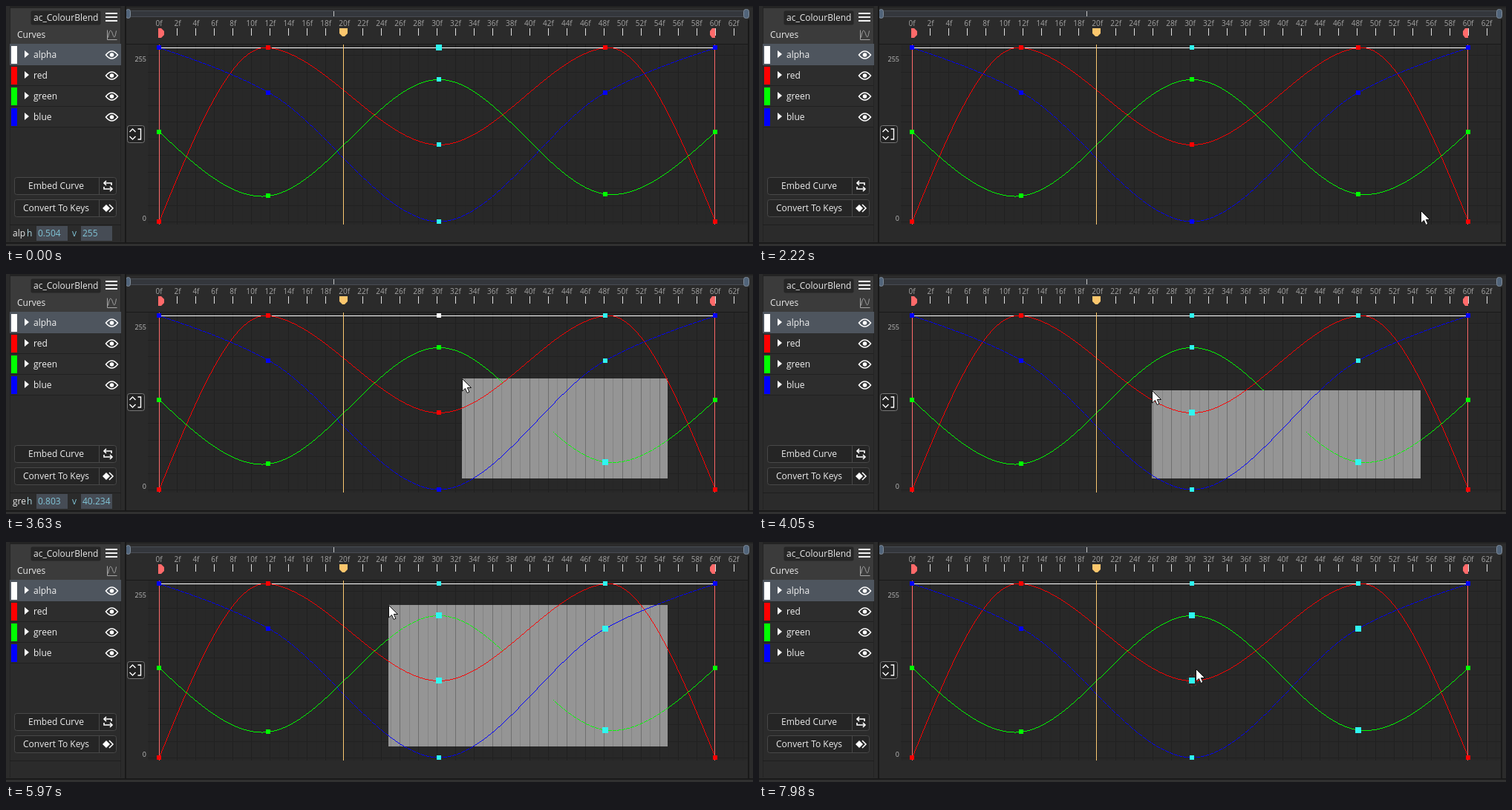
These frames come from a looping animation (1006x324 px, 8000 ms). An HTML page with a canvas:

```html
<!DOCTYPE html>
<html lang="en">
<head>
<meta charset="utf-8">
<title>Curve editor</title>
<style>
html, body { margin: 0; width: 100%; height: 100%; overflow: hidden; background: #2b2b2b; }
canvas { display: block; }
</style>
</head>
<body>
<canvas id="stage" width="1006" height="324"></canvas>
<script>
const ctx = document.getElementById('stage').getContext('2d');
const LOOP = 8000;
const CYAN = '#2ff5f0';
const ANCHOR = { x: 891, y: 276 };
const FRAME = 24.97 / 2;
const X = [206, 353, 583, 807, 955];

// y and slope at each key; the end slopes are relaxed
const curves = {
  alpha: { color: '#fff', y: [56, null, 56, null, 56] },
  blue: { color: '#00f', y: [56, 116.5, 290.5, 116.5, 56], slope: [0, .55, 0, -.55, 0] },
  green: { color: '#0f0', y: [170, 256, 99, 253.5, 170], slope: [0, -.12, 0, .12, 0] },
  red: { color: '#f00', y: [291, 56, 187, 56, 291], slope: [0, .12, 0, -.12, 0] }
};

for (const { y, slope } of Object.values(curves)) {
  if (!slope) continue;
  const relax = (a, b) => (3 * (y[b] - y[a]) / (X[b] - X[a]) - slope[b]) / 2;
  slope[0] = relax(0, 1);
  slope[4] = relax(4, 3);
}

// Pointer path: time, x, y, number of equal jumps since the previous entry
const path = [
  [1150, 948, 306, 1], [1660, 891, 276, 6], [2220, 891, 276, 1],
  [2580, 868, 250, 4], [2940, 800, 184, 4], [3030, 778, 166, 1],
  [3210, 744, 137, 2], [3480, 640, 140, 3], [3810, 535, 145, 4],
  [3900, 532, 152, 1], [4050, 529, 157, 1], [4200, 525, 160, 2],
  [4450, 524, 159, 1], [4630, 523, 158, 2], [4810, 522, 150, 1],
  [5080, 519, 113, 3], [5410, 517, 89, 4], [5690, 517, 88, 1],
  [5970, 515, 85, 1], [6230, 513, 77, 3], [6390, 512, 81, 2],
  [6570, 511, 84, 1], [6660, 511, 86, 1], [7380, 503, 52, 1],
  [7560, 510, 66, 1], [7980, 588, 171, 5]
];
const PRESS = 2220, RELEASE = 7380;

function pointerAt(t) {
  if (t < path[0][0]) return null;
  const i = path.findIndex(p => p[0] > t);
  if (i < 0) return { x: 588, y: 171 };
  const [t0, x0, y0] = path[i - 1], [t1, x1, y1, n] = path[i];
  const u = Math.floor((t - t0) / (t1 - t0) * n) / n;
  return { x: Math.round(x0 + (x1 - x0) * u), y: Math.round(y0 + (y1 - y0) * u) };
}

// Size of a selected key, 0 when it is not selected
function selection(t, name, key) {
  if (key === 2) {
    if (t < PRESS) return name === 'alpha' ? 8 : 6;
    if (t < 2940) return name === 'alpha' ? 6 : 0;
    if (t < 3727) return 0;
    return name === 'red' || name === 'green' && t >= 5327 ? 8 : 6;
  }
  if (key === 3 && t >= 2940)
    return name === 'green' || name === 'blue' && t >= 5080 ? 8 : 6;
  return 0;
}

function box(x, y, w, h, color) {
  ctx.fillStyle = color;
  ctx.fillRect(x, y, w, h);
}

function round(x, y, w, h, r, fill, stroke) {
  ctx.beginPath();
  ctx.roundRect(x + .5, y + .5, w - 1, h - 1, r);
  ctx.fillStyle = fill;
  ctx.fill();
  if (stroke) line(stroke);
}

function line(color, width = 1) {
  ctx.strokeStyle = color;
  ctx.lineWidth = width;
  ctx.stroke();
}

function shape(d, x, y, fill, stroke, width = 1) {
  const p = new Path2D(d);
  ctx.save();
  ctx.translate(x, y);
  if (fill) { ctx.fillStyle = fill; ctx.fill(p); }
  if (stroke) { ctx.strokeStyle = stroke; ctx.lineWidth = width; ctx.stroke(p); }
  ctx.restore();
}

function text(s, x, y, color = '#e8e8e8', size = 12, align = 'left') {
  ctx.font = `${size}px "Open Sans", "Noto Sans", sans-serif`;
  ctx.textAlign = align;
  ctx.fillStyle = color;
  ctx.fillText(s, x, y);
}

// Cubic Hermite value of a curve at x
function valueAt({ y, slope }, x) {
  x = Math.min(Math.max(x, X[0]), X[4]);
  const i = Math.max(1, X.findIndex(k => k >= x));
  const h = X[i] - X[i - 1], u = (x - X[i - 1]) / h, v = 1 - u;
  return v * v * (1 + 2 * u) * y[i - 1] + u * u * (1 + 2 * v) * y[i]
    + h * u * v * (v * slope[i - 1] - u * slope[i]);
}

// Crisp one-pixel line; every gap-th column is left out
function trace(curve, color = curve.color, x0 = X[0], x1 = X[4], gap = 0) {
  for (let x = x0; x <= x1; x++) {
    if (gap && x % gap === 0) continue;
    const a = Math.round(valueAt(curve, x - .5)), b = Math.round(valueAt(curve, x + .5));
    box(x, Math.min(a, b), 1, Math.max(1, Math.abs(a - b)), color);
  }
}

function drawSidebar(t) {
  box(0, 0, 162, 324, '#2b2b2b');
  box(5, 0, 150, 318, '#242424');
  box(6, 3, 148, 48, '#3b3b3b');
  round(33, 6, 95, 20, 2, '#262626');
  text('ac_ColourBlend', 37, 20);
  for (const y of [9, 14, 19]) box(134, y, 16, 2, '#f4f4f4');
  text('Curves', 15, 43);
  shape('M0 0V13H13M1 10C3 -2 5 -1 7 5S10 12 12 1', 136.5, 32.5, null, '#a5a5a5');

  box(5, 51, 150, 29, '#4e555e');
  ['alpha', 'red', 'green', 'blue'].forEach((name, i) => {
    const y = 52 + i * 28;
    if (i) {
      box(6, y, 148, 27, '#2d2d2d');
      box(6, y + 27, 148, 1, '#202020');
    }
    box(7, y + 2, 8, 24, curves[name].color);
    shape('M0 0L6 5L0 10Z', 25, y + 8, '#fff');
    text(name, 37, y + 18, '#f2f2f2');
    shape('M-8 0Q0 -10 8 0Q0 10 -8 0Z', 142.5, y + 14, null, '#fff', 1.5);
    ctx.beginPath();
    ctx.arc(142.5, y + 14, 2.8, 0, 7);
    ctx.fillStyle = '#fff';
    ctx.fill();
  });
  box(6, 164, 148, 131, '#2b2b2b');

  ['Embed Curve', 'Convert To Keys'].forEach((label, i) => {
    const y = 231 + 30 * i;
    round(11, y, 138, 24, 3, '#252525', '#484848');
    box(125, y + 1, 1, 22, '#484848');
    text(label, 67.5, y + 16, '#ececec', 12, 'center');
  });
  shape('M5 -1V-4H-5M-2 -7L-5 -4L-2 -1M-5 1V4H6M3 1L6 4L3 7', 137, 243, null, '#fff', 1.6);
  shape('M-7 0L-2 -5L3 0L-2 5Z', 137, 273, '#fff');
  shape('M2 -5L7 0L2 5', 137, 273, null, '#fff', 1.5);

  box(5, 295, 150, 1, '#1e1e1e');
  box(6, 296, 148, 22, '#2b2b2b');
  const info = t < PRESS ? ['alp', '0.504', '255']
    : t >= 2940 && t < 3727 ? ['gre', '0.803', '40.234'] : null;
  if (info) {
    text(info[0], 9, 311);
    text('h', 28, 311, '#a9d3dc');
    box(41, 297, 42, 20, '#464c55');
    text(info[1], 43, 311, '#80c4d6');
    text('v', 89, 311, '#80c4d6');
    box(101, 297, 42, 20, '#464c55');
    text(info[2], 103, 311, '#80c4d6');
  }
  box(160, 0, 2, 320, '#191919');
}

function drawMarkers() {
  shape('M0 0H4L8 4V9L4 13H0Z', 205, 30, '#ff6a6a');
  shape('M7 0H3L0 4V9L3 13H7Z', 948, 30, '#ff6a6a');
  shape('M0 0H11V7L7 11H4L0 7Z', 449, 30, '#fcc76d');
}

function drawRuler() {
  box(162, 0, 838, 51, '#2b2b2b');
  box(162, 0, 844, 2, '#222');
  round(165, 6, 834, 9, 3, '#34373c', '#484c53');
  box(441, 7, 1, 7, '#c6c6c6');
  round(161, 4, 7, 13, 3, '#51647a', '#7f8b98');
  round(993, 4, 8, 13, 3, '#51647a', '#7f8b98');
  for (let f = 0; f <= 62; f += 2) {
    const x = 206 + f * FRAME;
    text(f + 'f', x, 27, '#a2a2a2', 10, 'center');
    box(Math.floor(x), 30, 1, 10, '#e0e0e0');
  }
  box(162, 51, 838, 1, '#191919');
}

function drawGrid(x0, x1, y0, y1, odd, even) {
  for (let f = -1; f < 64; f++) {
    const x = Math.floor(206 + f * FRAME);
    if (x >= x0 && x < x1) box(x, y0, 1, y1 - y0, f % 2 ? odd : even);
  }
}

function drawSelection(p) {
  const w = ANCHOR.x - p.x, h = ANCHOR.y - p.y;
  if (w <= 0 || h <= 0) return;
  ctx.save();
  ctx.beginPath();
  ctx.rect(p.x, p.y, w, h);
  ctx.clip();
  box(p.x, p.y, w, h, '#959595');
  drawGrid(p.x, ANCHOR.x, p.y, ANCHOR.y, '#858585', '#6f6f6f');
  trace(curves.red);
  trace(curves.blue);
  trace(curves.green, '#0f0', 490, 668, 6);
  trace(curves.green, '#0f0', 737, 955, 6);
  ctx.restore();
}

function drawChart(t, p) {
  box(162, 52, 838, 267, '#2a2a2a');
  box(191, 52, 808, 243, '#282828');
  drawGrid(191, 999, 52, 295, '#262626', '#202020');
  for (let y = 291; y > 60; y -= 22.5) box(191, Math.round(y), 808, 1, '#212121');
  text('255', 189, 75, '#c0c0c0', 9, 'right');
  text('0', 189, 290, '#c0c0c0', 9, 'right');
  round(163, 161, 24, 24, 3, '#222', '#777');
  shape('M-8 -3L-4 -7L0 -3M-8 3L-4 7L0 3M3 -7H7V7H3', 174.5, 173, null, '#fff', 1.4);

  box(206, 56, 749, 1, '#fff');
  trace(curves.red);
  trace(curves.green);
  trace(curves.blue, '#00f', X[0], X[4], 6);
  if (t >= PRESS && t < RELEASE) drawSelection(p);

  box(206, 42, 1, 253, '#ff6a6a');
  box(954, 42, 1, 253, '#ff6a6a');
  box(454, 40, 1, 255, '#ffcb74');

  if (t >= 7980) {
    ctx.beginPath();
    ctx.arc(584, 187, 7.5, 0, 7);
    ctx.setLineDash([3, 3]);
    line('#7a2e2e');
    ctx.setLineDash([]);
  }
  for (const [name, { color, y }] of Object.entries(curves)) {
    y.forEach((v, i) => {
      if (v === null) return;
      const size = selection(t, name, i);
      const s = size || 6;
      box(Math.round(X[i] - s / 2), Math.round(v - s / 2), s, s, size ? CYAN : color);
    });
  }
}

function draw(t) {
  const p = pointerAt(t);
  box(0, 0, 1006, 324, '#2b2b2b');
  drawChart(t, p);
  drawRuler();
  drawMarkers();
  drawSidebar(t);
  box(999, 18, 2, 301, '#191919');
  box(0, 319, 1006, 2, '#191919');
  box(0, 321, 1006, 3, '#303030');
  if (p) shape('M0 0V16.5L4 13L6.6 19L9.4 17.8L6.8 12H12Z', p.x + .5, p.y + .5, '#fff', '#111');
}

const start = performance.now();
function tick() {
  draw((performance.now() - start) % LOOP);
  requestAnimationFrame(tick);
}
tick();
</script>
</body>
</html>
```
